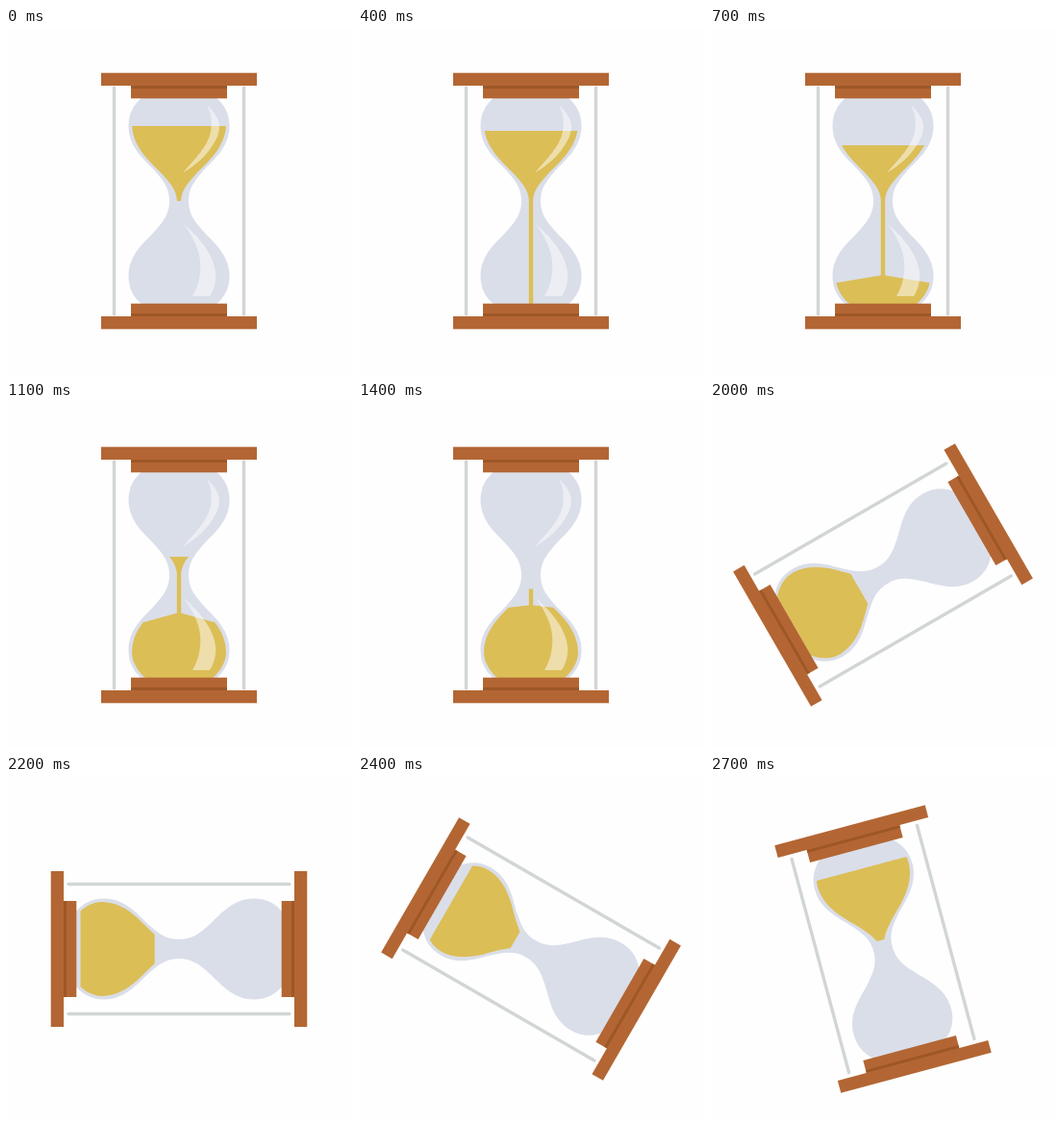
An HTML page with a canvas for the animation above (2.8 s loop, 360 by 360 pixels).

```html
<!DOCTYPE html>
<html lang="en">
<head>
<meta charset="utf-8">
<title>Hourglass</title>
<style>
  html, body { margin: 0; width: 100%; height: 100%; overflow: hidden; background: #fefefe; }
  canvas { display: block; width: 360px; height: 360px; }
</style>
</head>
<body>
<canvas id="stage" width="360" height="360"></canvas>
<script>
const ctx = document.getElementById('stage').getContext('2d');
const STEP = 100, STEPS = 28, TURN_AT = 16;
const WOOD = '#b36633', SHADE = '#9e5726', GLASS = '#dadee9', SAND = '#dcbe57', ROD = '#d1d5d6';

// Lower half shapes, with the neck at the origin.
const bulb = new Path2D('M-10-1H10V0C10 12 15 20 24 30C33 41 52.5 54 52.5 78C52.5 90 48 100 38 108H-38C-48 100-52.5 90-52.5 78C-52.5 54-33 41-24 30C-15 20-10 12-10 0Z');
const fill = new Path2D('M-2 0H2C3 12 8 17 18 28.5C29 40 48 55 49 79C49.5 90 43 100 35 107H-35C-43 100-49.5 90-49 79C-48 55-29 40-18 28.5C-8 17-3 12-2 0Z');
const shineTop = new Path2D('M29-100C44-86 46-74 35-58C26-44 17-38 4-29C15-43 30-56 33-72C35-84 33-92 29-100Z');
const shineLow = new Path2D('M5 24C22 39 36 56 38 74C39 84 36 93 32 99H14C22 86 24 70 21 56C18 44 12 34 5 24Z');

// Piecewise linear value from [step, value] pairs.
function track(keys, n) {
  if (n <= keys[0][0]) return keys[0][1];
  for (let i = 1; i < keys.length; i++) {
    const [a, u] = keys[i - 1], [b, v] = keys[i];
    if (n <= b) return u + (v - u) * (n - a) / (b - a);
  }
  return keys[keys.length - 1][1];
}

const LEVEL = [[0, -78], [2, -76.5], [4, -73], [7, -58], [11, -19], [13, 0]];
const PEAK = [[4, 107], [7, 77], [11, 39], [15, 28.5]];
const SHOULDER = [[4, 107], [7, 85], [11, 49], [15, 28.5]];
const HALF = [[4, 36], [7, 48], [11, 36], [15, 18]];
const HEAD = [[0, 0], [4, 107]];
const TAIL = [[13, 0], [15, 29]];

function box(color, x, y, w, h) {
  ctx.fillStyle = color;
  ctx.fillRect(x, y, w, h);
}

function shape(path, color) {
  ctx.fillStyle = color;
  ctx.fill(path);
}

// Draws once as is and once mirrored across the neck.
function mirrored(draw) {
  draw();
  ctx.save();
  ctx.scale(1, -1);
  draw();
  ctx.restore();
}

function clipped(points, flip) {
  const area = new Path2D();
  points.forEach(([x, y]) => area.lineTo(x, y));
  ctx.save();
  ctx.clip(area);
  if (flip) ctx.scale(1, -1);
  shape(fill, SAND);
  ctx.restore();
}

function band(top, bottom, flip) {
  if (bottom > top) clipped([[-60, top], [60, top], [60, bottom], [-60, bottom]], flip);
}

function pour(n) {
  band(track(LEVEL, n), 1, true);
  const peak = track(PEAK, n), side = track(SHOULDER, n), w = track(HALF, n);
  if (n > 4) {
    clipped([[-60, side], [-w, side], [0, peak], [w, side], [60, side], [60, 110], [-60, 110]]);
  }
  const top = track(TAIL, n), end = Math.min(track(HEAD, n), peak + 1);
  if (end > top) box(SAND, -2.2, top, 4.4, end - top);
}

function slide(n) {
  const drop = Math.max(0, n - 21) * 3.2;
  band(28.5 - drop, n > 21 ? 285.7 - 180 - drop : 107);
}

function draw(n) {
  const turning = n > TURN_AT;
  ctx.setTransform(1, 0, 0, 1, 0, 0);
  box('#fefefe', 0, 0, 360, 360);
  ctx.translate(180, 180);
  if (turning) ctx.rotate((n - TURN_AT) * Math.PI / 12);

  ctx.strokeStyle = ROD;
  ctx.lineWidth = 3.4;
  ctx.lineCap = 'round';
  const reach = turning ? 115 : 118;
  for (const x of [-67.5, 67.5]) {
    ctx.beginPath();
    ctx.moveTo(x, -reach);
    ctx.lineTo(x, reach);
    ctx.stroke();
  }

  mirrored(() => shape(bulb, GLASS));
  if (turning) {
    slide(n);
  } else {
    pour(n);
    shape(shineTop, 'rgba(255,255,255,.5)');
    shape(shineLow, 'rgba(255,255,255,.5)');
  }

  mirrored(() => {
    box(WOOD, -50, 106.7, 100, 14);
    box(SHADE, -50, 117, 100, 3.2);
    box(WOOD, -81, 120, 162, 13.3);
  });
}

function tick() {
  draw(Math.floor(performance.now() / STEP) % STEPS);
  requestAnimationFrame(tick);
}
tick();
</script>
</body>
</html>
```
